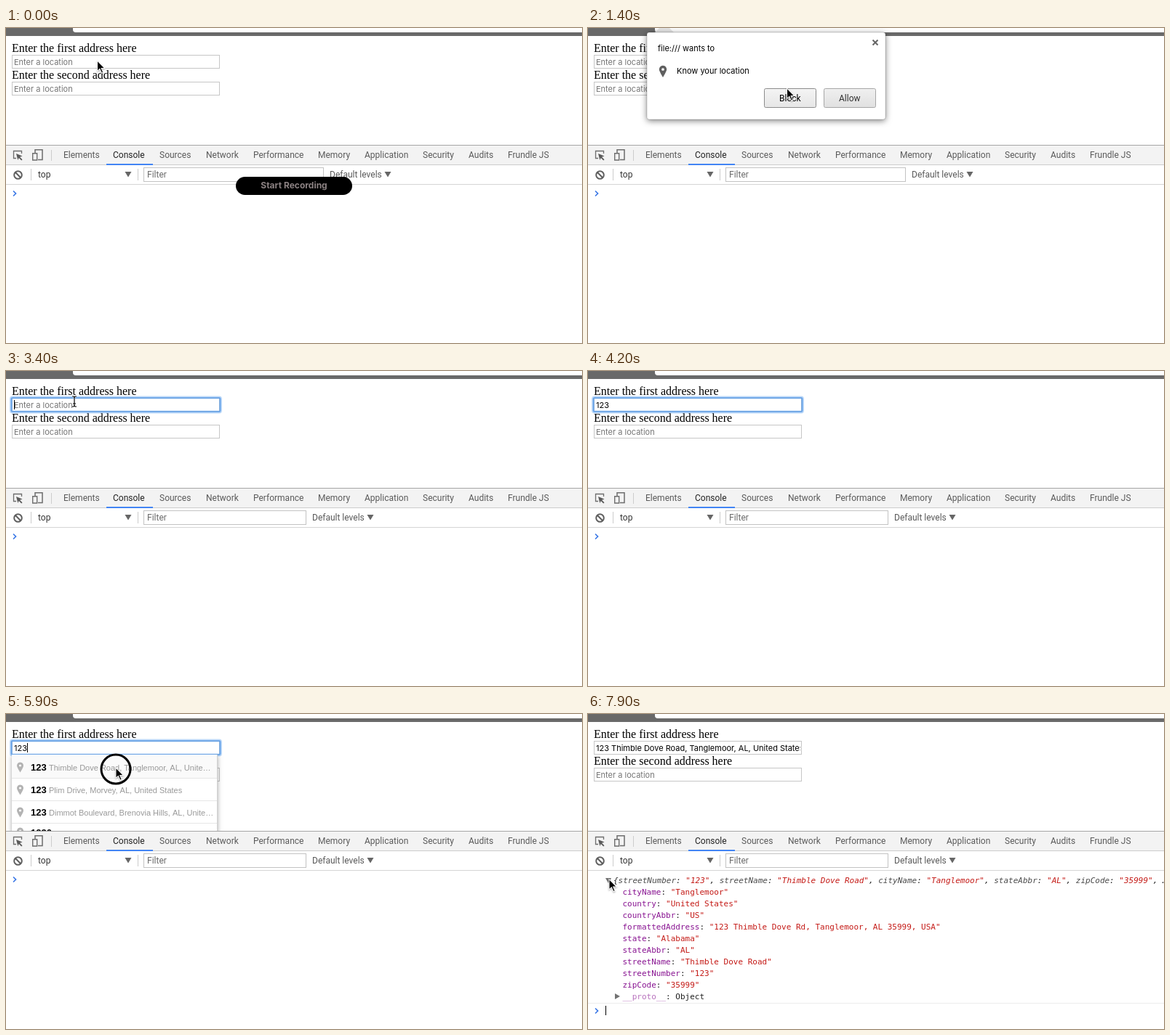
An HTML page with a canvas that plays this animation: 792x434 px, repeating every 8 s.

```html
<!DOCTYPE html>
<html lang="en">
<head>
<meta charset="utf-8">
<title>Address autocomplete</title>
<style>
html, body { margin: 0; width: 100%; height: 100%; overflow: hidden; background: #fff; }
canvas { display: block; width: 792px; height: 434px; }
</style>
</head>
<body>
<canvas id="stage" width="792" height="434"></canvas>
<script>
const ctx = document.getElementById('stage').getContext('2d');
const LOOP = 8000, STEP = 100;

const UI = '12px Roboto, sans-serif';
const FORM = '11px Inter, sans-serif';
const LABEL = '16px "Liberation Serif", serif';
const MONO = '11px "DejaVu Sans Mono", monospace';
const KEY = '#881391', STR = '#c41a16';

const STREET = 'Thimble Dove Road', CITY = 'Tanglemoor', ZIP = '35999';
const ADDRESS = `123 ${STREET}, ${CITY}, AL, United States`;
const HINTS = [`${STREET}, ${CITY}, AL, Unite…`, 'Plim Drive, Morvey, AL, United States',
  'Dimmot Boulevard, Brenovia Hills, AL, Unite…'];
const PREVIEW = [['streetNumber', '123'], ['streetName', STREET], ['cityName', CITY],
  ['stateAbbr', 'AL'], ['zipCode', ZIP]];
const DETAILS = [['cityName', CITY], ['country', 'United States'], ['countryAbbr', 'US'],
  ['formattedAddress', `123 Thimble Dove Rd, ${CITY}, AL ${ZIP}, USA`], ['state', 'Alabama'],
  ['stateAbbr', 'AL'], ['streetName', STREET], ['streetNumber', '123'], ['zipCode', ZIP]];
const TABS = [['Elements', 79], ['Console', 147], ['Sources', 211], ['Network', 275],
  ['Performance', 340], ['Memory', 429], ['Application', 493], ['Security', 573],
  ['Audits', 636], ['Frundle JS', 690]];

// Event times in ms
const FOCUS = 400, ASK = 800, ANSWER = 2300, TYPE = 3900, SUGGEST = 4400,
  PICK = 6100, LOG = 6300, EXPAND = 7700;
const CLICKS = [400, 2000, 5800, 7500];
// Pointer path: time, x, y
const PATH = [[0, 125, 45], [900, 125, 45], [1400, 273, 83], [1800, 358, 96], [2300, 358, 96],
  [3100, 94, 42], [4300, 94, 42], [4900, 120.5, 104], [5300, 124, 102], [5700, 150.5, 74],
  [6100, 150.5, 74], [6600, 82, 282], [6900, 50, 240], [7300, 28.5, 227.5], [8000, 28.5, 227.5]];

const between = (t, a, b) => t >= a && t < b;

function pointerAt(t) {
  const i = PATH.findIndex(p => p[0] > t);
  const [t0, x0, y0] = PATH[i - 1], [t1, x1, y1] = PATH[i];
  const k = (t - t0) / (t1 - t0), e = k * k * (3 - 2 * k);
  return { x: x0 + (x1 - x0) * e, y: y0 + (y1 - y0) * e };
}

function text(s, x, y, font, color) {
  ctx.font = font;
  ctx.fillStyle = color;
  ctx.fillText(s, x, y);
  return x + ctx.measureText(s).width;
}

function box(x, y, w, h, color) {
  ctx.fillStyle = color;
  ctx.fillRect(x, y, w, h);
}

function frame(x, y, w, h, color) {
  ctx.strokeStyle = color;
  ctx.lineWidth = 1;
  ctx.strokeRect(x + 0.5, y + 0.5, w - 1, h - 1);
}

function round(x, y, w, h, r) {
  ctx.beginPath();
  ctx.roundRect(x, y, w, h, r);
}

function poly(points, color, x = 0, y = 0) {
  ctx.beginPath();
  for (let i = 0; i < points.length; i += 2) ctx.lineTo(x + points[i], y + points[i + 1]);
  ctx.closePath();
  ctx.fillStyle = color;
  ctx.fill();
}

function lines(paths, color, width) {
  ctx.strokeStyle = color;
  ctx.lineWidth = width;
  ctx.beginPath();
  for (const p of paths) {
    ctx.moveTo(p[0], p[1]);
    for (let i = 2; i < p.length; i += 2) ctx.lineTo(p[i], p[i + 1]);
  }
  ctx.stroke();
}

function circle(x, y, r) {
  ctx.beginPath();
  ctx.arc(x, y, r, 0, Math.PI * 2);
}

function shadow(color, blur, dy) {
  ctx.shadowColor = color;
  ctx.shadowBlur = blur;
  ctx.shadowOffsetY = dy;
}

function pin(x, y, r, color, hole) {
  ctx.beginPath();
  ctx.arc(x, y, r, Math.PI * 0.9, Math.PI * 0.1);
  ctx.quadraticCurveTo(x + r * 0.7, y + r, x, y + r * 2.1);
  ctx.quadraticCurveTo(x - r * 0.7, y + r, x - r * 0.95, y + r * 0.31);
  ctx.fillStyle = color;
  ctx.fill();
  circle(x, y, r * 0.36);
  ctx.fillStyle = hole;
  ctx.fill();
}

function field(y, value, focused) {
  box(8, y, 286, 19, '#fff');
  frame(8, y, 286, 19, '#c6c6c6');
  if (focused) {
    round(7, y - 0.5, 288, 20, 2);
    ctx.strokeStyle = 'rgba(110,170,240,.45)';
    ctx.lineWidth = 4;
    ctx.stroke();
    round(7.5, y, 287, 19, 1);
    ctx.strokeStyle = '#62a0e8';
    ctx.lineWidth = 1.6;
    ctx.stroke();
  }
  ctx.save();
  ctx.beginPath();
  ctx.rect(10, y, 282, 19);
  ctx.clip();
  const end = text(value || 'Enter a location', 11, y + 14, FORM, value ? '#000' : '#757575');
  ctx.restore();
  return value ? end : 11;
}

function suggestions(p) {
  ctx.save();
  ctx.beginPath();
  ctx.rect(0, 56, 792, 105);
  ctx.clip();
  ctx.save();
  shadow('rgba(0,0,0,.35)', 6, 2);
  box(8, 56, 283, 130, '#fff');
  ctx.restore();
  for (let i = 0; i < 4; i++) {
    const y = 57 + i * 31, base = y + (i < 3 ? 21 : 18);
    if (i < 3 && between(p.y, y, y + 31)) box(8, y, 283, 31, '#fafafa');
    if (i) box(8, y, 283, 1, '#e6e6e6');
    pin(19.5, base - 7, 4.5, '#b3b3b3', '#fff');
    text(i < 3 ? '123' : '1230', 34, base, 'bold 13px "Liberation Sans", sans-serif', '#000');
    if (i < 3) text(HINTS[i], 59, base - 0.5, '11px "Liberation Sans", sans-serif', '#999');
  }
  box(290, 56, 1, 105, '#d0d0d0');
  ctx.restore();
}

function page(t, p) {
  box(0, 0, 792, 11, '#696969');
  round(92, -10, 720, 16, 4);
  ctx.fillStyle = '#fff';
  ctx.fill();
  text('Enter the first address here', 8, 33, LABEL, '#000');
  text('Enter the second address here', 8, 70, LABEL, '#000');
  const focused = between(t, FOCUS, ASK) || between(t, ANSWER, PICK);
  const typed = '123'.slice(0, Math.max(0, Math.floor((t - TYPE) / 100) + 1));
  field(74, '', false);
  const end = field(37, t >= PICK ? ADDRESS : typed, focused);
  if (focused && blink(t)) box(Math.round(end), 40, 1, 13, '#000');
  if (between(t, SUGGEST, PICK)) suggestions(p);
}

const blink = t => (t + 600) % 1000 < 600;

function devtools(wide) {
  box(0, 161, 792, 273, '#fff');
  box(0, 161, 792, 28, '#f3f3f3');
  box(0, 161, 792, 1, '#a5a5a5');
  box(0, 188, 792, 1, '#cccccc');
  box(138, 187, 64, 2, '#4285f4');
  // Inspect and device icons
  lines([[14, 179.5, 10.5, 179.5, 10.5, 169.5, 21.5, 169.5, 21.5, 173]], '#6e6e6e', 1.3);
  poly([14, 173, 22.5, 176.5, 19, 177.7, 22.5, 181.2, 21.2, 182.5, 17.7, 179, 16.3, 182], '#5a5a5a');
  lines([[40, 172, 40, 167.7, 50, 167.7, 50, 181.5, 44, 181.5]], '#6e6e6e', 1.5);
  lines([[36.7, 172.7, 42.7, 172.7, 42.7, 182, 36.7, 182, 36.7, 172]], '#6e6e6e', 1.4);
  box(62, 168, 1, 15, '#ccc');
  for (const [name, x] of TABS) text(name, x, 179, UI, name === 'Console' ? '#222' : '#5a5a5a');

  box(0, 215, 792, 1, '#d5d5d5');
  circle(16.5, 202.5, 5.3);
  ctx.strokeStyle = '#5f5f5f';
  ctx.lineWidth = 2;
  ctx.stroke();
  lines([[12.8, 198.8, 20.2, 206.2]], '#5f5f5f', 2);
  box(34, 194, 1, 16, '#ccc');
  box(181, 194, 1, 16, '#ccc');
  text('top', 44, 206, UI, '#333');
  const arrow = [0, 0, 9, 0, 4.5, 7.5];
  poly(arrow, '#666', 163.5, 198);
  const right = wide ? 437 : 413;
  frame(189, 192, right - 189, 20, '#c3c3c3');
  text('Filter', 194, 206, UI, '#6b6b6b');
  text('Default levels', right + 8, 206, UI, '#5a5a5a');
  poly(arrow, '#666', right + 83.5, 198);
}

function prompt(y) {
  lines([[10, y - 3.5, 13.5, y, 10, y + 3.5]], '#3b78e7', 1.7);
}

function log(t) {
  if (t < LOG) return prompt(228);
  const open = t >= EXPAND, italic = 'italic ' + MONO;
  let x = text('{', 35, 233, italic, '#222');
  for (const [key, value] of PREVIEW) {
    x = text(key, x, 233, italic, '#4a4a4a');
    x = text(': ', x, 233, italic, '#222');
    x = text(`"${value}"`, x, 233, italic, STR);
    x = text(', ', x, 233, italic, '#222');
  }
  text('…}', x, 233, italic, '#222');
  if (!open) {
    poly([25, 225.5, 32, 229.5, 25, 233.5], '#727272');
    box(0, 238, 792, 1, '#ececec');
    return prompt(249);
  }
  poly([24, 226, 32, 226, 28, 233], '#727272');
  DETAILS.forEach(([key, value], i) => {
    const y = 249 + i * 16;
    x = text(key, 47.5, y, MONO, KEY);
    x = text(': ', x, y, MONO, '#222');
    text(`"${value}"`, x, y, MONO, STR);
  });
  poly([37, 385, 44, 389, 37, 393], '#727272');
  x = text('__proto__', 47.5, 393, MONO, '#b871bd');
  text(': Object', x, 393, MONO, '#222');
  box(0, 398, 792, 1, '#ececec');
  prompt(409);
  if (blink(t)) box(24, 402, 1, 13, '#000');
}

function button(label, x, p) {
  const hover = between(p.x, x, x + 72) && between(p.y, 82, 110);
  const fill = ctx.createLinearGradient(0, 83, 0, 110);
  fill.addColorStop(0, hover ? '#f4f4f4' : '#f0f0f0');
  fill.addColorStop(1, hover ? '#e6e6e6' : '#e0e0e0');
  round(x + 0.5, 83.5, 71, 26, 2);
  ctx.fillStyle = fill;
  ctx.fill();
  ctx.strokeStyle = hover ? '#8c8c8c' : '#a6a6a6';
  ctx.lineWidth = 1;
  ctx.stroke();
  text(label, x + 21, 101, UI, hover ? '#000' : '#333');
}

function permission(p) {
  poly([92, 6, 105, -7, 118, 6], '#e6e6e6');
  ctx.save();
  shadow('rgba(0,0,0,.5)', 9, 2);
  round(81, 6, 328, 120, 3);
  ctx.fillStyle = '#fff';
  ctx.fill();
  ctx.restore();
  ctx.strokeStyle = 'rgba(0,0,0,.22)';
  ctx.lineWidth = 0.8;
  ctx.stroke();
  text('file:/// wants to', 96, 32, FORM, '#000');
  text('Know your location', 122, 63, FORM, '#000');
  pin(103, 57, 5.2, '#5f5f5f', '#fff');
  lines([[391.5, 16.5, 398.5, 23.5], [398.5, 16.5, 391.5, 23.5]], '#666', 2);
  button('Block', 242, p);
  button('Allow', 324, p);
}

function recordPill(t) {
  const alpha = 1 - Math.max(0, t - 100) / 400;
  if (alpha <= 0) return;
  ctx.globalAlpha = alpha;
  round(316, 205, 160, 25, 12.5);
  ctx.fillStyle = '#000';
  ctx.fill();
  ctx.textAlign = 'center';
  text('Start Recording', 396, 221, 'bold 12px Inter, sans-serif', '#8c8283');
  ctx.textAlign = 'left';
  ctx.globalAlpha = 1;
}

function pointer(t, p) {
  if (CLICKS.some(c => between(t, c, c + 200))) {
    circle(p.x + 0.5, p.y + 2, 20);
    ctx.strokeStyle = '#000';
    ctx.lineWidth = 3;
    ctx.stroke();
  }
  if (between(t, TYPE, SUGGEST)) return;
  const { x, y } = p;
  if (between(t, 3000, TYPE) || between(t, 6400, 7200)) {
    const beam = [[x - 3, y - 7, x - 1, y - 7, x, y - 5.5, x, y + 5.5, x - 1, y + 7, x - 3, y + 7],
      [x + 3, y - 7, x + 1, y - 7, x, y - 5.5], [x + 3, y + 7, x + 1, y + 7, x, y + 5.5],
      [x - 2, y + 3, x + 2, y + 3]];
    lines(beam, 'rgba(255,255,255,.7)', 2.5);
    lines(beam, '#000', 1.2);
    return;
  }
  ctx.save();
  shadow('rgba(0,0,0,.35)', 2, 1);
  poly([0, -1, 0, 15.5, 3.7, 12, 6.3, 18, 9.3, 16.7, 6.8, 11, 12, 11], '#fff', x, y);
  ctx.restore();
  poly([1, 1.3, 1, 13.3, 4, 10.4, 6.8, 16.6, 8, 16, 5.4, 10, 9.6, 10], '#000', x, y);
}

function draw(now) {
  const t = Math.floor((now % LOOP) / STEP) * STEP;
  const p = pointerAt(t);
  box(0, 0, 792, 434, '#fff');
  page(t, p);
  devtools(t < ANSWER);
  log(t);
  if (between(t, ASK, ANSWER)) permission(p);
  recordPill(t);
  pointer(t, p);
}

const start = performance.now();
function tick() {
  draw(performance.now() - start);
  requestAnimationFrame(tick);
}
tick();
</script>
</body>
</html>
```
